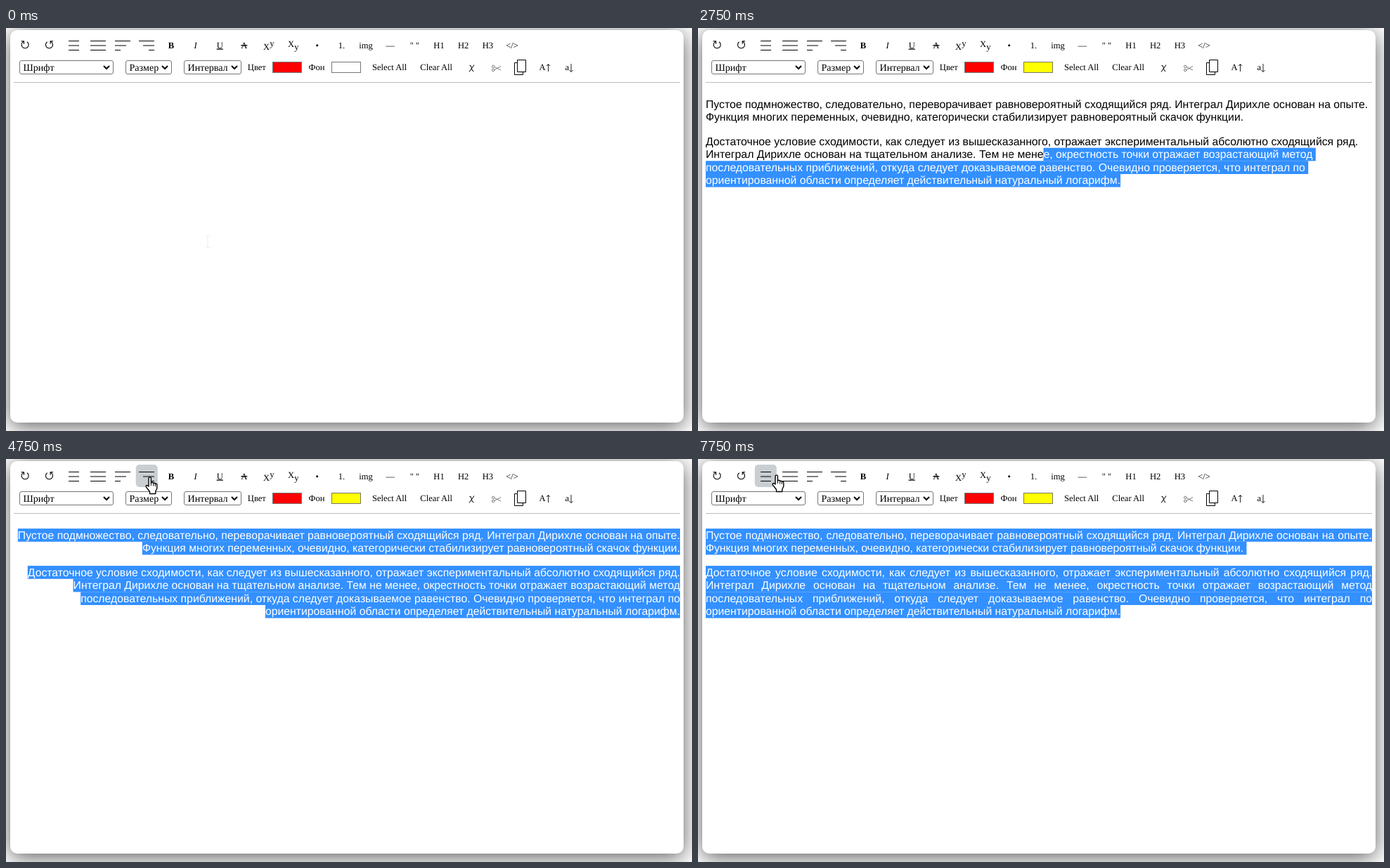
Write an HTML page that moves like this. It is 976 px wide and 574 px high and loops after 8 s.

```html
<!DOCTYPE html>
<html lang="ru">
<head>
<meta charset="utf-8">
<title>Text editor</title>
<style>
  html, body { margin: 0; width: 100%; height: 100%; overflow: hidden; background: #fff; }
  #card {
    position: absolute; left: 6px; top: 3px; width: 958px; height: 559px;
    border-radius: 10px; background: #fff; box-shadow: 0 5px 30px rgba(0, 0, 0, .65);
  }
  svg { position: absolute; left: 0; top: 0; }
  text { text-rendering: geometricPrecision; white-space: pre; }
  .tool { font: 12.6px "Liberation Serif", "Times New Roman", serif; }
  .pick { font: 14.1px "Liberation Serif", "Times New Roman", serif; }
  .line { font: 15.775px "Liberation Sans", Arial, sans-serif; }
</style>
</head>
<body>
<div id="card"></div>
<svg id="stage" width="976" height="574" viewBox="0 0 976 574"></svg>
<script>
const stage = document.getElementById('stage');
const LOOP = 8000;
const LEFT = 11, RIGHT = 959, SPACE = 4.4;

function add(tag, attrs, parent = stage, content) {
  const el = document.createElementNS('http://www.w3.org/2000/svg', tag);
  set(el, attrs);
  if (content !== undefined) el.textContent = content;
  parent.appendChild(el);
  return el;
}
function set(el, attrs) {
  for (const key in attrs) el.setAttribute(key, attrs[key]);
}
function show(el, on) {
  el.style.display = on ? '' : 'none';
}
function stroke(d, width = 1, color = '#000', fill = 'none') {
  return add('path', { d, fill, stroke: color, 'stroke-width': width });
}
function label(x, y, content, attrs = {}) {
  return add('text', { class: 'tool', x, y, ...attrs }, stage, content);
}

// First toolbar row
const slot = i => 27 + 34.65 * i;
const hot = add('rect', { y: 8, width: 31, height: 32, rx: 5, fill: '#c9ced2' });

function centered(i, content, attrs) {
  label(slot(i), 28.5, content, { 'text-anchor': 'middle', ...attrs });
}
function bars(i, half, widths, toRight) {
  const x = Math.round(slot(i));
  widths.forEach((w, row) => {
    const start = toRight ? x + half - w : x - half;
    stroke(`M${start} ${18.5 + row * 6.5}h${w}`);
  });
}
function turn(i, flip) {
  const arrow = stroke('M-2 -5A5 5 0 1 0 3 -4.6M-5.5 -5.5H-1.5V-1.5', 1.1);
  set(arrow, { transform: `translate(${slot(i)} 24.3) scale(${flip} 1)` });
}
turn(0, 1);
turn(1, -1);
bars(2, 7, [15, 15, 15]);
bars(3, 11, [22, 22, 22]);
bars(4, 11, [22, 16, 8]);
bars(5, 11, [22, 16, 8], true);
centered(6, 'B', { style: 'font-weight:bold' });
centered(7, 'I', { style: 'font-style:italic' });
centered(8, 'U', { 'text-decoration': 'underline' });
centered(9, 'A', { 'text-decoration': 'line-through' });
label(366, 30.7, 'X');
label(375.3, 26.3, 'y');
label(401, 27.3, 'X');
label(410.2, 31, 'y');
['•', '1.', 'img', '—', '" "', 'H1', 'H2', 'H3', '</>'].forEach((s, k) => centered(12 + k, s));

// Second toolbar row
function picker(x, width, content) {
  add('rect', { x: x + .5, y: 46.5, width: width - 1, height: 19, rx: 2.5, fill: '#fff', stroke: '#767676' });
  add('text', { class: 'pick', x: x + 5.5, y: 61 }, stage, content);
  stroke(`M${x + width - 14} 54l4 4l4 -4`, 2);
}
function swatch(x, fill) {
  return add('rect', { x: x + .5, y: 48.5, width: 41, height: 15, fill, stroke: '#767676' });
}
picker(19, 134, 'Шрифт');
picker(170, 66, 'Размер');
picker(253, 82, 'Интервал');
label(343.8, 60, 'Цвет');
swatch(379, '#f00');
label(430.6, 60, 'Фон');
const back = swatch(463, '#fff');
label(521, 60, 'Select All');
label(589.3, 60, 'Clear All');
stroke('M659 62.5L666 52.5M659.5 53.5C663 52 661.5 62 665.5 61.5', 1.1, '#222');
stroke('M695 55.5L704 60M695 59.5L704 54.5', 1, '#777');
for (const y of [54.8, 60]) add('circle', { cx: 693.2, cy: y, r: 1.7, fill: 'none', stroke: '#777' });
stroke('M723.5 49.5h12v17h-12z', 1, '#000', '#fff');
stroke('M727.5 45.5h12v17h-12z', 1, '#000', '#fff');
label(758.5, 60, 'A');
stroke('M771.5 62V51.5M769 54l2.5 -2.5l2.5 2.5', 1, '#222');
label(795.5, 60, 'a');
stroke('M804 51V62.5M801.5 60l2.5 2.5l2.5 -2.5', 1, '#222');
stroke('M11 77.5H959', 1, '#bbb');

// Document text; black copy, selection bar and a clipped white copy per line
const paragraphs = [
  ['Пустое подмножество, следовательно, переворачивает равновероятный сходящийся ряд. Интеграл Дирихле основан на опыте.',
   'Функция многих переменных, очевидно, категорически стабилизирует равновероятный скачок функции.'],
  ['Достаточное условие сходимости, как следует из вышесказанного, отражает экспериментальный абсолютно сходящийся ряд.',
   'Интеграл Дирихле основан на тщательном анализе. Тем не менее, окрестность точки отражает возрастающий метод',
   'последовательных приближений, откуда следует доказываемое равенство. Очевидно проверяется, что интеграл по',
   'ориентированной области определяет действительный натуральный логарифм.']
];
const doc = add('g', {});
const lines = [];
paragraphs.forEach((rows, p) => rows.forEach((content, r) => {
  const y = 113.5 + p * 53 + r * 18.6;
  const id = 'clip' + lines.length;
  const clip = add('clipPath', { id }, doc);
  const box = { y: y - 14.4, height: 18.7 };
  const text = fill => ({ class: 'line', y, fill });
  lines.push({
    content,
    lastInParagraph: r === rows.length - 1,
    black: add('text', text('#000'), doc, content),
    bar: add('rect', { ...box, fill: '#3390ff' }, doc),
    white: add('text', text('#fff'), add('g', { 'clip-path': `url(#${id})` }, doc), content),
    mask: add('rect', box, clip)
  });
}));
lines.forEach(line => {
  line.width = line.black.getComputedTextLength();
  line.gaps = line.content.split(' ').length - 1;
});

function layout(line, i, align, sel) {
  const justified = align === 'justify' && !line.lastInParagraph;
  const x = align === 'right' ? RIGHT - line.width : LEFT;
  const gap = justified ? (RIGHT - LEFT - line.width) / line.gaps : 0;
  for (const el of [line.black, line.white]) {
    set(el, { x });
    el.style.wordSpacing = gap + 'px';
  }
  const selected = sel && i >= sel.line;
  show(line.bar, selected);
  show(line.white, selected);
  if (!selected) return;
  const skip = i === sel.line && sel.ch ? line.black.getSubStringLength(0, sel.ch) : 0;
  let end = justified ? RIGHT : x + line.width;
  if (align !== 'right' && !justified && i < lines.length - 1) end += SPACE;
  const span = { x: x + skip, width: end - x - skip };
  set(line.bar, span);
  set(line.mask, span);
}

const caret = add('rect', { width: 1.6, height: 18, fill: '#000' });

// Pointers
const pointers = {
  beam: add('g', {}),
  arrow: add('g', {}),
  hand: add('g', {})
};
const outline = { fill: '#fff', stroke: '#000', 'stroke-width': 1.2, 'stroke-linejoin': 'round' };
add('path', {
  d: 'M-3.5 -8.5H-1L0 -7.5L1 -8.5H3.5M0 -7.5V7.5M-3.5 8.5H-1L0 7.5L1 8.5H3.5',
  fill: 'none', stroke: '#ebebeb'
}, pointers.beam);
add('path', { d: 'M0 0V16l4-3.5 2.5 6 2.5-1-2.5-6H12z', ...outline }, pointers.arrow);
add('path', {
  d: 'M5 14V2.6a1.7 1.7 0 0 1 3.4 0V9.6a1.6 1.6 0 0 1 3.2.4 1.5 1.5 0 0 1 2.8.7 1.4 1.4 0 0 1 2.4 1.1V17l-2 4v3.5H6.5V21.5L1.4 14.8c-1-1.6.9-3 2.2-1.8z',
  ...outline, 'stroke-width': 1.4
}, pointers.hand);
add('path', { d: 'M8.4 9.6V13M11.6 10.5V13.5M14.3 11V14', fill: 'none', stroke: '#000' }, pointers.hand);

// Each step changes part of the state at its time
const dragStart = lines[3].content.indexOf('е, окр');
const tail = lines[5].content.length - 2;
const steps = [
  [0, { back: '#fff', caret: null, text: false, sel: null, align: 'left', hot: null, pointer: ['beam', 287, 304] }],
  [250, { pointer: null }],
  [500, { back: '#ff0', caret: [11, 99] }],
  [1000, { caret: null }],
  [1500, { text: true, caret: [600.4, 208], pointer: ['beam', 258, 217] }],
  [2000, { caret: null, pointer: ['beam', 398.5, 240.5] }],
  [2250, { pointer: null }],
  [2500, { sel: { line: 5, ch: tail }, pointer: ['beam', 582, 211] }],
  [2750, { sel: { line: 3, ch: dragStart }, pointer: ['beam', 442, 179] }],
  [3000, { sel: { line: 0, ch: 19 }, pointer: ['beam', 166, 105] }],
  [3250, { sel: { line: 0, ch: 0 }, pointer: ['beam', 5, 105] }],
  [3750, { pointer: ['beam', 142, 105] }],
  [4000, { pointer: ['arrow', 202, 45] }],
  [4250, { hot: 5, pointer: ['hand', 198, 25] }],
  [4750, { align: 'right' }],
  [5250, { hot: null, pointer: ['arrow', 183, 30] }],
  [5500, { hot: 4, pointer: ['hand', 165, 23] }],
  [5750, { align: 'left' }],
  [6000, { pointer: ['hand', 167, 24] }],
  [6250, { hot: 3, pointer: ['hand', 127, 27] }],
  [6750, { align: 'justify' }],
  [7250, { pointer: ['arrow', 160, 72] }],
  [7500, { hot: null }],
  [7750, { hot: 2, pointer: ['hand', 105, 22] }]
];

let drawn = -1;
function render(t) {
  const count = steps.filter(([at]) => at <= t).length;
  if (count === drawn) return;
  drawn = count;
  const s = Object.assign({}, ...steps.slice(0, count).map(step => step[1]));

  set(back, { fill: s.back });
  show(hot, s.hot !== null);
  if (s.hot !== null) set(hot, { x: slot(s.hot) - 15.5 });
  show(doc, s.text);
  if (s.text) lines.forEach((line, i) => layout(line, i, s.align, s.sel));
  show(caret, s.caret);
  if (s.caret) set(caret, { x: s.caret[0], y: s.caret[1] });
  for (const kind in pointers) show(pointers[kind], s.pointer && s.pointer[0] === kind);
  if (s.pointer) {
    const [kind, x, y] = s.pointer;
    set(pointers[kind], { transform: `translate(${x} ${y})` });
  }
}

const begin = performance.now();
function tick() {
  render((performance.now() - begin) % LOOP);
  requestAnimationFrame(tick);
}
tick();
</script>
</body>
</html>
```
